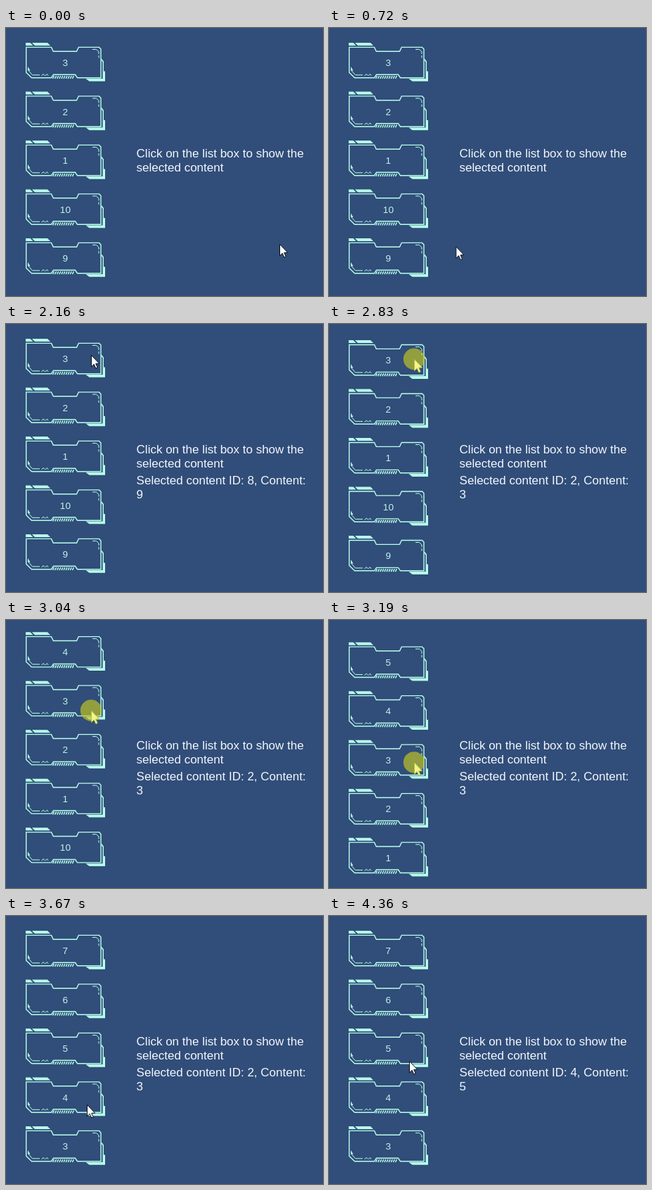
These frames come from a looping animation (451x381 px, 5230 ms). An HTML page:

```html
<!DOCTYPE html>
<html lang="en">
<head>
<meta charset="utf-8">
<title>Circular list demo</title>
<style>
  html, body { margin: 0; width: 100%; height: 100%; overflow: hidden; background: #314d79; }
  svg { display: block; width: 451px; height: 381px; }
  text { font-family: "Liberation Sans", Arial, sans-serif; }
  .label { font-size: 13.6px; text-anchor: middle; fill: #bdf5e8; }
  .info { font-size: 17px; fill: #f3f7fb; }
  #cursor { fill: #fff; stroke: #0c0f14; stroke-width: 1; }
  #cursor.held { fill: #f1f58c; stroke: #b9be48; }
</style>
</head>
<body>
<svg viewBox="0 0 451 381">
  <defs>
    <!-- Panel artwork, vertically centred on y = 0 -->
    <g id="panel" fill="none" stroke="currentColor">
      <g fill="currentColor" stroke="none">
        <path d="M28-28H34.5L38.5-24H28ZM37-28H59L63-24H41Z"/>
        <path d="M135.5-6L139-1.5V12.5H141V26.8H118.5L113.5 23H137.6V-.5L135.5-3.5Z"/>
        <path d="M31 6L34.5 11.5H31Z"/>
      </g>
      <path stroke-width="1.4" d="M28.7-21.6H64.5L67.3-15.7H100.5L103.3-21.6H132.5L135-19V21.7H101.5L98.5 17.3H67.5L64.5 21.7H36.5L28.7 14.2Z"/>
      <path d="M31.5 11L37.5 17.8H48M50.5 18.7L53.5 16.5L55 18.7M56 18.7L58.5 16.5L60 18.7"/>
      <path d="M123-18.6H128.5L132-15.2V-12M132-10V-6.5"/>
      <path id="ticks" stroke-width="1.5"/>
    </g>
  </defs>
  <g id="list"></g>
  <text class="info" x="185.6" y="184">Click on the list box to show the</text>
  <text class="info" x="185.6" y="204">selected content</text>
  <text class="info" id="line1" x="185.6" y="228"></text>
  <text class="info" id="line2" x="185.6" y="248"></text>
  <circle id="halo" r="15.2" fill="#c7c920" fill-opacity=".66"/>
  <path id="cursor" d="M.5.5V16.8L4.2 13.2L6.8 19L9.2 18L6.7 12.3H11.7Z"/>
</svg>
<script>
const LOOP = 5230, STEP = 70, PHASE = 30;
const PITCH = 69.5, TOP = 49, SLOTS = 5, ITEMS = 10;
const HOLD = 140, RECOVER = 210, FADE = 100;
const $ = id => document.getElementById(id);

const clamp = v => Math.min(1, Math.max(0, v));
const smooth = k => k * k * (3 - 2 * k);
const smoother = k => k * k * k * (10 - 15 * k + 6 * k * k);
const progress = (t, start, end) => clamp((t - start) / (end - start));

// Pointer moves, each easing on from where the last one ended
const home = { x: 389, y: 307 };
const moves = [
  { start: 250, end: 780, x: 149, y: 311 },
  { start: 780, end: 990, x: 113, y: 323 },
  { start: 1670, end: 2130, x: 121, y: 44 },
  { start: 2767, end: 3463, x: 121, y: 292 },
  { start: 3463, end: 3670, x: 115, y: 268 },
  { start: 3670, end: 4080, x: 114, y: 206 }
];

const clicks = [
  { down: 1260, item: 9 },
  { down: 2420, item: 3 },
  { down: 4150, item: 5 }
].map(c => ({ ...c, up: c.down + HOLD }));
const drag = { down: 2830, up: 3390 };

function pointerAt(t) {
  return moves.reduce((p, m) => {
    const k = smooth(progress(t, m.start, m.end));
    return { x: p.x + (m.x - p.x) * k, y: p.y + (m.y - p.y) * k };
  }, home);
}

// The drag carries the list four places down
const scrollAt = t => 4 * PITCH * smoother(progress(t, 2751, 3575));

function tint(t, item) {
  const click = clicks.find(c => c.item === item && t >= c.down && t < c.down + RECOVER);
  const level = click ? 1 - 0.22 * progress(t, click.down, click.down + FADE) : 1;
  return `rgb(${[182, 255, 234].map(v => Math.round(v * level))})`;
}

function make(tag, parent, attrs) {
  const el = document.createElementNS("http://www.w3.org/2000/svg", tag);
  for (const name in attrs) el.setAttribute(name, attrs[name]);
  return parent.appendChild(el);
}

$("ticks").setAttribute("d",
  Array.from({ length: 10 }, (_, i) => `M${66.5 + i * 3.1} 23l2-4`).join(""));

const slots = Array.from({ length: SLOTS }, () => {
  const group = make("g", $("list"), {});
  make("use", group, { href: "#panel" });
  return { group, label: make("text", group, { class: "label", x: 84.4, y: 5.1 }) };
});

function draw(t) {
  const stepped = Math.floor((t - PHASE) / STEP) * STEP + PHASE;
  const offset = scrollAt(stepped);
  const first = Math.floor(offset / PITCH + 0.5);
  slots.forEach(({ group, label }, i) => {
    const n = first - i;
    const item = (n + 2 + ITEMS) % ITEMS + 1;
    group.setAttribute("transform", `translate(0 ${TOP + offset - PITCH * n})`);
    group.style.color = tint(t, item);
    label.textContent = item;
  });

  const chosen = clicks.filter(c => t >= c.up).pop();
  $("line1").textContent = chosen ? `Selected content ID: ${chosen.item - 1}, Content:` : "";
  $("line2").textContent = chosen ? chosen.item : "";

  const { x, y } = pointerAt(stepped);
  const held = [...clicks, drag].some(c => t >= c.down && t < c.up);
  $("cursor").setAttribute("transform", `translate(${x} ${y})`);
  $("cursor").classList.toggle("held", held);
  $("halo").setAttribute("transform", `translate(${x} ${y})`);
  $("halo").setAttribute("visibility", held ? "visible" : "hidden");
}

const began = performance.now();
function tick() {
  draw((performance.now() - began) % LOOP);
  requestAnimationFrame(tick);
}
tick();
</script>
</body>
</html>
```
